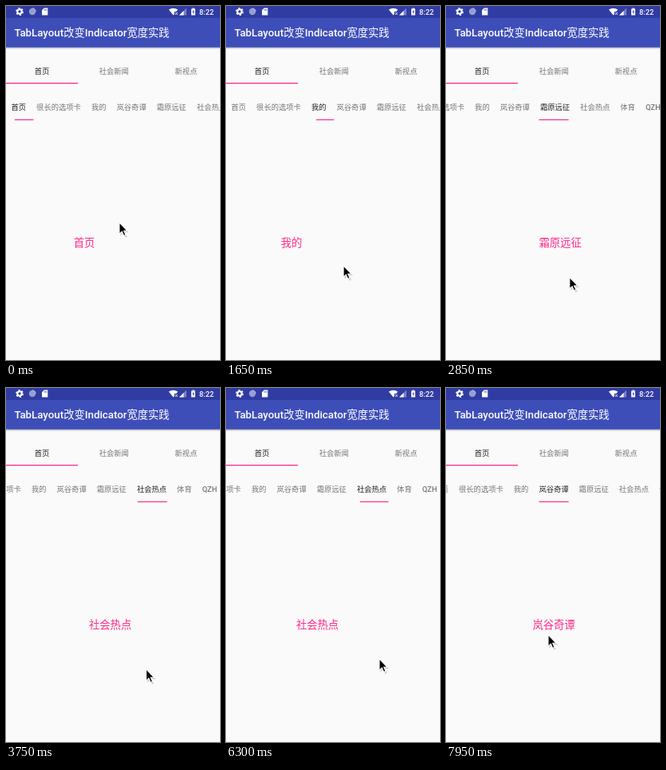
Recreate the animation shown at these times as an HTML page. Size 268 px wide and 443 px high, loop 8000 ms.

```html
<!DOCTYPE html>
<html lang="zh-CN">
<head>
<meta charset="utf-8">
<style>
  html, body { margin: 0; width: 100%; height: 100%; overflow: hidden; background: #fafafa; }
  svg { display: block; width: 100vw; height: 100vh; }
  text { font-family: Roboto, "Noto Sans CJK SC", "Noto Sans CJK", sans-serif; white-space: pre; }
  .title { font-size: 13.3px; font-weight: 500; fill: #fff; }
  .title tspan { font-weight: 400; }
  .tab { font-size: 9.3px; fill: #757575; }
  .latin { font-weight: 500; }
  .tab.on { fill: #212121; }
  .page { font-size: 13.3px; text-anchor: middle; }
  .pink { fill: #ff2a87; }
  .mid { text-anchor: middle; }
</style>
</head>
<body>
<svg viewBox="0 0 268 443" preserveAspectRatio="none">
  <defs>
    <linearGradient id="shade" x2="0" y2="1">
      <stop stop-color="#000" stop-opacity=".28"/>
      <stop offset="1" stop-color="#000" stop-opacity="0"/>
    </linearGradient>
  </defs>
  <rect width="268" height="443" fill="#fafafa"/>
  <rect y="51.5" width="268" height="3" fill="url(#shade)"/>
  <rect width="268" height="51.8" fill="#3e4eb9"/>
  <rect width="268" height="15" fill="#303ca2"/>

  <g fill="#fff">
    <circle cx="17" cy="7" r="2.7" fill="none" stroke="#fff" stroke-width="2.1"/>
    <circle cx="17" cy="7" r="4.2" fill="none" stroke="#fff" stroke-width="1.5" stroke-dasharray="2.2"/>
    <circle cx="33" cy="7" r="4.2" opacity=".5"/>
    <path d="M33 2.8a4.2 4.2 0 0 1 4.2 4.2" fill="none" stroke="#fff" stroke-width=".8" opacity=".6"/>
    <path d="M47.8 2.5H52.3V11.5H45V5.2z"/>
    <path d="M48 4v1.7M49.4 4v1.7M50.8 4v1.7" stroke="#303ca2" stroke-width=".7"/>
    <path d="M203.8 4.6Q209.5 .9 215.2 4.6L213.2 7H210.8V10.2L209.5 11.6z"/>
    <path d="M212 8l2.8 3M214.8 8l-2.8 3" stroke="#fff" stroke-width=".8"/>
    <path d="M226 2.5V11.5H217z" opacity=".35"/>
    <path d="M222.5 6V11.5H217z"/>
    <path d="M233.6 2.5H235.6V3.5H237V11.5H232V3.5H233.6z"/>
    <path d="M235 4.8L233.3 7.8H234.4V10.2L235.9 7H235z" fill="#303ca2"/>
    <text x="242" y="10.8" font-size="9.2" font-weight="500">8:22</text>
  </g>
  <text class="title" x="10.4" y="38.3">TabLayout<tspan>改变</tspan>Indicator<tspan>宽度实践</tspan></text>

  <text class="tab mid on" x="45" y="85">首页</text>
  <text class="tab mid" x="135.3" y="85">社会新闻</text>
  <text class="tab mid" x="225.5" y="85">新视点</text>
  <rect class="pink" y="96" width="90" height="1.3"/>

  <g id="strip"><rect id="bar" class="pink" y="141.8" height="1.2"/></g>
  <g id="pages"></g>
  <g id="cursor">
    <g transform="translate(-.6 -.9) scale(.96)">
      <path d="M1 1V16.5L4.5 13.3 7 19 9.5 18 7 12.3H12z" fill="#000" opacity=".18" transform="translate(1.2 1.5)"/>
      <path d="M.6 .8V15.8L4 12.6 6.4 18.2 8.9 17.1 6.5 11.7H11z" fill="#000" stroke="#fff" stroke-width="1.1"/>
    </g>
  </g>
</svg>
<script>
const $ = id => document.getElementById(id);
const LOOP = 8000, STEP = 150, WIDTH = 270, MAX_SCROLL = 75;
const SIZE = 9.3, GAP = 13;
const SWIPE = 700, DRAG = 245, DRAG_SHARE = 0.4;

const labels = ['首页', '很长的选项卡', '我的', '岚谷奇谭', '霜原远征', '社会热点', '体育', 'QZH'];

// start time, page direction, pointer x and y at touch down
const swipes = [
  [-84, 1, 179, 271], [857, 1, 137, 291], [1530, 1, 200, 325], [2400, 1, 200, 337],
  [3030, 1, 210, 342], [3740, 1, 180, 352], [4500, 1, 160, 352], [5250, -1, 37, 344],
  [5901, -1, 84, 339], [6600, -1, 80, 336], [7230, -1, 90, 311]
];
// where the pointer rests between swipes: time, x, y
const rests = [[2250, 202, 333], [6300, 192, 339], [7950, 128, 309], [LOOP, 128, 309]];
const track = swipes
  .flatMap(([t, dir, x, y]) => [[t, x, y], [t + DRAG, x - dir * DRAG_SHARE * WIDTH, y]])
  .concat(rests)
  .sort((a, b) => a[0] - b[0]);

function addText(parent, cls, str, x, y) {
  const el = document.createElementNS('http://www.w3.org/2000/svg', 'text');
  el.setAttribute('class', cls);
  el.setAttribute('x', x);
  el.setAttribute('y', y);
  el.textContent = str;
  parent.append(el);
  return el;
}

let nextX = GAP / 2;
const tabs = labels.map((str, i) => {
  const latin = /[A-Z]/.test(str);
  const x = nextX, w = SIZE * (latin ? 2 : str.length);
  nextX += w + GAP;
  addText($('pages'), 'page pink', str, (i + 0.5) * WIDTH, 301);
  return { x, w, el: addText($('strip'), latin ? 'tab latin' : 'tab', str, x, 130.3) };
});

const mix = (a, b, k) => a + (b - a) * k;
const clamp = (v, lo, hi) => Math.min(hi, Math.max(lo, v));

// steady drag, then a decelerating settle
function swipeEase(ms) {
  if (ms <= 0) return 0;
  if (ms < DRAG) return DRAG_SHARE * ms / DRAG;
  const left = 1 - clamp((ms - DRAG) / (SWIPE - DRAG), 0, 1);
  return 1 - (1 - DRAG_SHARE) * left ** 5;
}

function pointerAt(t) {
  const i = Math.max(1, track.findIndex(k => k[0] >= t));
  const a = track[i - 1], b = track[i];
  const k = (t - a[0]) / (b[0] - a[0]);
  return [mix(a[1], b[1], k), mix(a[2], b[2], k)];
}

function draw(t) {
  const pos = swipes.reduce((sum, [start, dir]) => sum + dir * swipeEase(t - start), 0);
  const i = Math.floor(pos + 1e-6), k = pos - i;
  const a = tabs[i], b = tabs[Math.min(i + 1, tabs.length - 1)];
  const x = mix(a.x, b.x, k), w = mix(a.w, b.w, k);
  const scroll = clamp(x + w / 2 - WIDTH / 2, 0, MAX_SCROLL);

  $('bar').setAttribute('x', x);
  $('bar').setAttribute('width', w);
  $('strip').setAttribute('transform', `translate(${-scroll})`);
  $('pages').setAttribute('transform', `translate(${-pos * WIDTH})`);
  $('cursor').setAttribute('transform', `translate(${pointerAt(t)})`);
  tabs.forEach((tab, n) => tab.el.classList.toggle('on', n === Math.round(pos)));
}

function tick() {
  const t = performance.now() % LOOP;
  draw(Math.floor(t / STEP) * STEP);
  requestAnimationFrame(tick);
}
tick();
</script>
</body>
</html>
```
